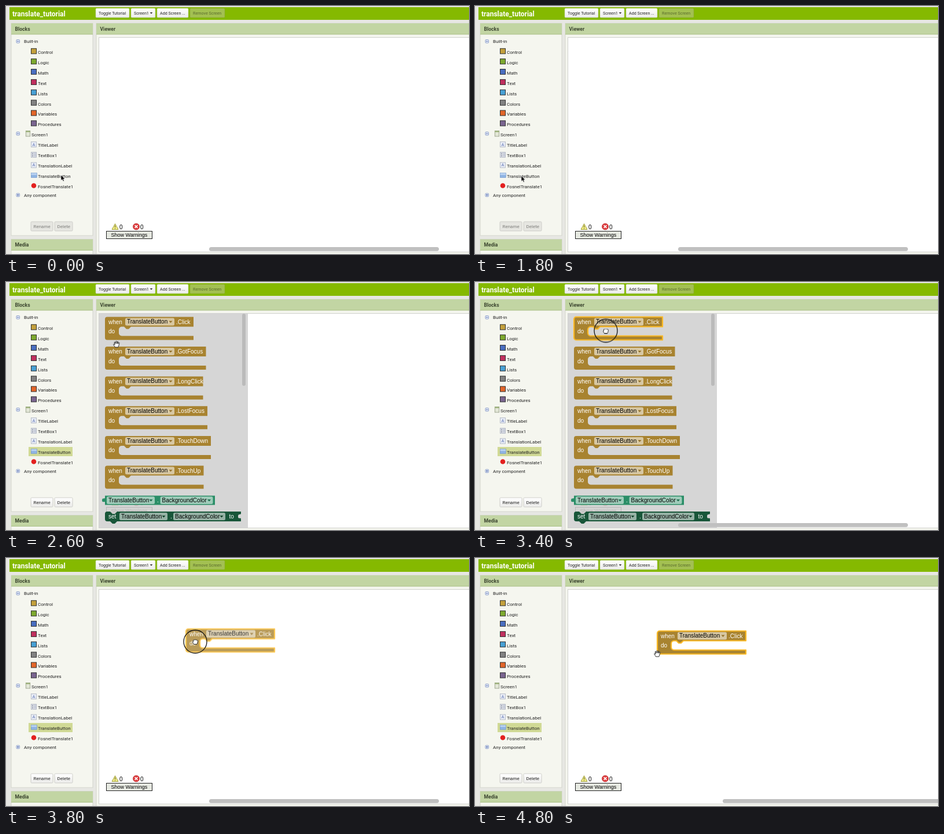
Write an HTML page that moves like this. It is 800 px wide and 430 px high and loops after 4900 ms.

```html
<!DOCTYPE html>
<html lang="en">
<head>
<meta charset="utf-8">
<title>Block editor</title>
<style>
html, body { margin: 0; width: 100%; height: 100%; overflow: hidden; background: #e7e7e3; }
svg { display: block; width: 800px; height: 430px; }
text { font: 8px Roboto, sans-serif; fill: #222; white-space: pre; }
.title { font-size: 12px; font-weight: 700; fill: #fff; }
.head { font-size: 8.6px; font-weight: 700; fill: #3c4630; }
.tool { font-size: 7.15px; }
.arial, .code { font: 9px "Liberation Sans", Arial, sans-serif; fill: #000; }
.code { font-size: 10px; }
.white { fill: #fff; }
.dim { fill: #7d7d7a; }
.hot { stroke: #fbb924; stroke-width: 2.2; stroke-linejoin: round; }

/* One loop is 4.9 s in 0.1 s ticks. Visibility switches hard. */
.flyout, .picked, .idle, .glow, .bar, .bar2, .drop, .arrow, .open, .shut, .ring {
  animation: 4.9s step-end infinite;
}
.flyout { animation-name: flyout; }
.picked { animation-name: picked; }
.idle { animation-name: idle; }
.glow { animation-name: glow; }
.bar { animation-name: bar; }
.bar2 { animation-name: bar2; }
.drop { animation-name: drop; }
.arrow { animation-name: arrow; }
.open { animation-name: open; }
.shut { animation-name: shut; }
.ring { animation-name: ring; }
.drag { animation: drag 4.9s infinite; }
.cursor { animation: cursor 4.9s infinite; }

@keyframes flyout { 0%, 71.42% { opacity: 0 } 44.89% { opacity: 1 } }
@keyframes picked { 0% { opacity: 0 } 44.89%, 100% { opacity: 1 } }
@keyframes idle { 0% { opacity: 1 } 44.89%, 100% { opacity: 0 } }
@keyframes glow { 0% { opacity: 0 } 65.3%, 100% { opacity: 1 } }
@keyframes bar { 0%, 65.3% { opacity: 1 } 44.89%, 83.67%, 100% { opacity: 0 } }
@keyframes bar2 { 0% { opacity: 0 } 83.67%, 100% { opacity: 1 } }
@keyframes drop { 0% { opacity: 0 } 71.42% { opacity: .8 } 83.67%, 100% { opacity: 1 } }
@keyframes arrow { 0% { opacity: 1 } 51.02%, 100% { opacity: 0 } }
@keyframes open { 0%, 65.3% { opacity: 0 } 51.02%, 83.67%, 100% { opacity: 1 } }
@keyframes shut { 0%, 83.67%, 100% { opacity: 0 } 65.3% { opacity: 1 } }
@keyframes ring { 0%, 44.89%, 83.67%, 100% { opacity: 0 } 40.81%, 65.3% { opacity: 1 } }
@keyframes drag {
  0%, 71.42% { transform: translate(171px, 60.5px); animation-timing-function: steps(3) }
  77.55% { transform: translate(311px, 123px); animation-timing-function: steps(2) }
  81.63%, 100% { transform: translate(315px, 126.5px) }
}
@keyframes cursor {
  0%, 24.48% { transform: translate(95px, 293px); animation-timing-function: steps(4) }
  32.65%, 44.89% { transform: translate(80px, 294.5px); animation-timing-function: steps(4) }
  53.06%, 57.14% { transform: translate(191px, 108px); animation-timing-function: steps(4) }
  65.3%, 71.42% { transform: translate(226px, 84.5px); animation-timing-function: steps(3) }
  77.55% { transform: translate(327px, 145px); animation-timing-function: steps(2) }
  81.63%, 85.71% { transform: translate(331px, 148px); animation-timing-function: steps(4) }
  93.87%, 100% { transform: translate(315px, 166px) }
}
</style>
</head>
<body>
<svg viewBox="0 0 800 430" xmlns="http://www.w3.org/2000/svg">
  <defs>
    <linearGradient id="btn" x2="0" y2="1">
      <stop offset="0" stop-color="#fff"/><stop offset="1" stop-color="#ececea"/>
    </linearGradient>
  </defs>
  <rect width="800" height="430" fill="#e7e7e3"/>
  <rect x="6" y="2" width="794" height="22" fill="#85b900"/>
  <text class="title" x="11" y="17.7">translate_tutorial</text>
  <g id="tools"></g>

  <g id="panels"></g>
  <rect x="160.5" y="54.5" width="650" height="372" fill="#fff" stroke="#d0d0cc"/>

  <rect class="picked" x="39" y="286" width="76" height="16" fill="#d0d995"/>
  <g id="tree"></g>
  <g class="idle" id="off"></g>
  <g class="picked" id="on"></g>

  <path d="M188.500 377.500L194 387.500H183Z" fill="#f3ee86" stroke="#9a9a3c" stroke-linejoin="round"/>
  <path d="M188.500 380.500v3.500m0 1v1.200" stroke="#55551c"/>
  <circle cx="225" cy="382.500" r="5.600" fill="#dc3a3c" stroke="#b52a2c" stroke-width=".6"/>
  <path d="M222.600 380.100l4.800 4.800m0-4.800l-4.800 4.800" stroke="#fff" stroke-width="1.600"/>
  <text class="code" x="196" y="386.500">0</text>
  <text class="code" x="232" y="386.500">0</text>
  <rect x="173.500" y="390.500" width="79" height="13" fill="#e6e9e1" stroke="#222"/>
  <text class="arial" x="181.500" y="400.300">Show Warnings</text>

  <g class="flyout">
    <rect x="160" y="54" width="258" height="373" fill="#d0d0d0" opacity=".86"/>
    <rect x="408" y="55" width="6" height="125" rx="3" fill="#bbb"/>
    <g id="blocks"></g>
  </g>
  <rect class="bar" x="351" y="418" width="397" height="7" rx="3.500" fill="#c0c0c0"/>
  <rect class="bar2" x="428" y="418" width="397" height="7" rx="3.500" fill="#c0c0c0"/>
  <g class="drop"><g class="drag" id="dragged"></g></g>

  <g class="cursor">
    <circle class="ring" r="20" fill="none" stroke="#111" stroke-width="1.300"/>
    <path class="arrow" d="M0 0V9.500L2.200 7.500L3.800 11L5.400 10.300L3.900 6.900H6.800Z" fill="#000" stroke="#fff" stroke-width=".6"/>
    <g fill="#fff" stroke="#111" stroke-width=".9" stroke-linejoin="round">
      <path class="open" d="M-2.600 5C-3.500 3-5.500 1-5.200 0C-4.600-1-3.500 0-2.900.8L-3.800-3C-3.800-4.400-2.400-4.400-2.100-3.200L-1.500-1L-1.300-4.600C-1-5.800.3-5.800.4-4.600L.6-1L1.400-4.200C1.900-5.300 3-4.900 2.800-3.800L2.400-.8L3.600-2.600C4.400-3.400 5.200-2.700 4.800-1.800C4.200 0 4 3 2.800 5Z"/>
      <path class="shut" d="M-2.500 4.500C-4 2.500-4.800 1.200-4.200.2L-3.400 0L-3.600-1.800C-3.400-3.200-2-3.200-1.600-2.600C-1-3.800.4-3.600.7-2.800C1.400-3.600 2.600-3.200 2.700-2.400C3.600-2.800 4.400-2 4.300-1C4.200 1 3.800 3 2.700 4.500Z"/>
    </g>
  </g>
</svg>
<script>
const put = (id, html) => { document.getElementById(id).innerHTML = html; };
const label = (x, y, s, cls = '') => `<text class="${cls}" x="${x}" y="${y}">${s}</text>`;
const box = (x, y, w, h, fill, more = '') =>
  `<rect x="${x}" y="${y}" width="${w}" height="${h}" fill="${fill}" ${more}/>`;
const at = (x, y, html) => `<g transform="translate(${x} ${y})">${html}</g>`;

// Page chrome
const tool = (x, w, s) =>
  box(x, 4, w, 16, 'url(#btn)', 'rx="1.5" stroke="#b9c99a" stroke-width=".6"') + label(x + 5, 14.7, s, 'tool');
put('tools',
  tool(155, 58, 'Toggle Tutorial') + tool(216, 42, 'Screen1') + tool(261, 54, 'Add Screen ...') +
  '<path d="M248.700 11h4.600l-2.300 2.800z" fill="#333"/>' +
  box(318, 4, 60, 16, '#a3c052', 'rx="1.5" stroke="#8aa63c" stroke-width=".6"') +
  '<text class="tool" x="323" y="14.700" style="fill:#5a6b2c">Remove Screen</text>');

const panel = (x, y, w, h, s) =>
  box(x, y, w, h, '#f5f6ef', 'stroke="#cdcfc6" stroke-width=".8"') +
  box(x, y, w, 19, '#c2d5a3') + box(x, y + 18.5, w, 1, '#a9bf86') + label(x + 6.5, y + 12.7, s, 'head');
put('panels',
  panel(9, 30, 141, 368, 'Blocks') + panel(9, 404.5, 141, 40, 'Media') + panel(156, 30, 660, 420, 'Viewer'));

// Component tree
const toggle = (y, plus) =>
  box(18, y - 2.5, 5.5, 5.5, '#eef2fb', 'rx="1" stroke="#6f87bd" stroke-width=".8"') +
  `<path d="M19.200 ${y + .25}h3.100${plus ? 'm-1.550-1.550v3.100' : ''}" stroke="#304f9a" stroke-width=".9"/>`;
const frame = 'stroke="#a9afbd" stroke-width=".8"';
const letter = box(.5, .5, 9, 9, '#e9edf6', frame) +
  '<text x="2.400" y="7.700" style="fill:#5870b0;font-size:7.500px">A</text>';
const icons = {
  TitleLabel: letter,
  TextBox1: box(.5, .5, 9, 9, '#e4e6ec', frame) +
    '<path d="M2 2.500h2m-1 0v5m-1 0h2" stroke="#777f95" stroke-width=".8"/>' + box(5, 1.5, 4, 7, '#c9ceda'),
  TranslationLabel: letter,
  TranslateButton: box(.3, 1, 10, 8, '#8fb4e3', 'stroke="#6d93c8" stroke-width=".6"') + box(.6, 1.3, 9.4, 3, '#b9d2f1'),
  FosnelTranslate1: '<circle cx="5" cy="5" r="4.300" fill="#e3201f"/>'
};
const swatches = {
  Control: '#c3a03c', Logic: '#7da92f', Math: '#4a6ec0', Text: '#c0305e',
  Lists: '#48a0d4', Colors: '#828282', Variables: '#e2662a', Procedures: '#7a6590'
};
put('tree',
  toggle(61) + label(31, 64.3, 'Built-in') +
  Object.entries(swatches).map(([s, c], i) =>
    box(43.5, 73.8 + i * 17.87, 9, 9, c, 'stroke="#2e2e2e" stroke-width="1"') +
    label(55, 83.2 + i * 17.87, s)).join('') +
  toggle(221) + box(34.3, 216.5, 7.4, 9.5, '#e2e6d6', 'stroke="#8f9780" stroke-width=".8"') +
  box(34.3, 216.5, 7.4, 2.2, '#9db37a') + label(44, 226.2, 'Screen1') +
  Object.entries(icons).map(([s, art], i) =>
    at(43, 235 + i * 17.87, art) + label(55, 244.1 + i * 17.87, s)).join('') +
  toggle(327.5, true) + label(31, 331.2, 'Any component'));

const actions = (fill, cls) => [[43, 38, 'Rename'], [84, 31, 'Delete']].map(([x, w, s]) =>
  box(x, 374, w, 16, fill, 'rx="1.5" stroke="#c4c4c0" stroke-width=".8"') + label(x + 4.5, 385, s, cls)).join('');
put('off', actions('#e6e6e1', 'dim'));
put('on', actions('url(#btn)', ''));

// Code blocks
const pill = (x, y, w, s, tint) =>
  box(x, y, w, 13, '#fff', 'rx="2.5" opacity=".55"') + label(x + 3, y + 9.7, s, 'code') +
  `<path d="M${x + w - 9.5} ${y + 5}h6l-3 3.500z" fill="${tint}"/>`;
const cShape = w => `M0 4a4 4 0 0 1 4-4H${w}V17H45l-4 4h-4l-4-4H29a5 5 0 0 0-5 5v6a5 5 0 0 0 5 5` +
  `H${w}V40H4a4 4 0 0 1-4-4Z`;
const eventBlock = (name, w, hot = '') =>
  `<path d="${cShape(w)}" fill="#a88330"/>` +
  (hot && `<path class="${hot}" d="${cShape(w)}" fill="none"/>`) +
  label(6, 12, 'when', 'code white') + pill(35, 2, 85, 'TranslateButton', '#94722a') +
  label(123, 12, '.' + name, 'code white') + label(6, 28.5, 'do', 'code white');

const events = [['Click', 153], ['GotFocus', 174.5], ['LongClick', 169.5], ['LostFocus', 177],
  ['TouchDown', 183], ['TouchUp', 170.5]];
const getter =
  '<path d="M0 0H190V16H0V11C-1 9-5 13-5 8S-1 6 0 4Z" fill="#2a8e67"/>' +
  pill(3, 1.5, 83, 'TranslateButton', '#1d6d4e') + label(90, 11.3, '.', 'code white') +
  pill(95.5, 1.5, 91, 'BackgroundColor', '#1d6d4e');
const setter =
  '<path d="M0 4a4 4 0 0 1 4-4H9l4 4h4l4-4H235V4C234 6 230 3 230 8.500S234 10 235 12V17H21l-4 4h-4l-4-4H4a4 4 0 0 1-4-4Z" fill="#185639"/>' +
  label(6, 12, 'set', 'code white') + pill(25, 2, 83, 'TranslateButton', '#12442c') +
  label(113, 12, '.', 'code white') + pill(118, 2, 90, 'BackgroundColor', '#12442c') +
  label(214.5, 12, 'to', 'code white');
put('blocks',
  events.map(([s, w], i) => at(171, 60.5 + i * 51.6, eventBlock(s, w, i ? '' : 'hot glow'))).join('') +
  at(171, 370.5, getter) + at(171, 398, setter));
put('dragged', eventBlock('Click', 153, 'hot'));
</script>
</body>
</html>
```
